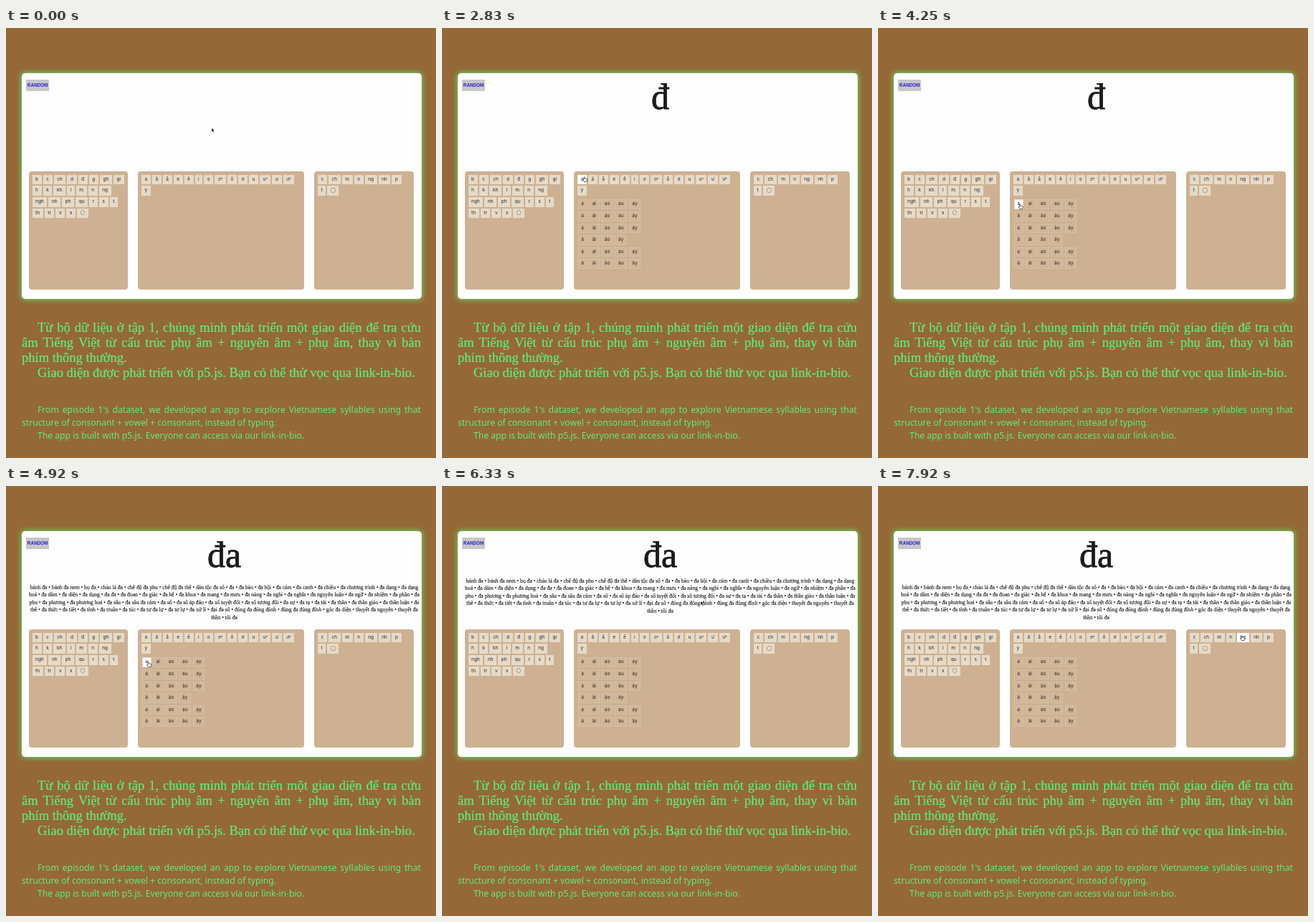
Write an HTML page that moves like this. It is 600 by 600 pixels and loops after 8000 ms.

```html
<!DOCTYPE html>
<html lang="vi">
<head>
<meta charset="utf-8">
<title>Syllable explorer</title>
<style>
html, body { margin: 0; width: 100%; height: 100%; overflow: hidden; }
body { position: relative; background: #956837; }
body > *, .row { position: absolute; white-space: nowrap; }
#app { left: 22px; top: 63px; width: 557.5px; height: 314.5px; border-radius: 5px;
  background: #fdfdfe; box-shadow: 0 0 7px 1px #62d868; }
#random { left: 28px; top: 72px; width: 32px; height: 16px; background: #c8c7c8;
  color: #2a20d2; font: bold 6.3px/15.5px "Liberation Sans", Arial, sans-serif; text-align: center; }
#word, #list { left: 4.5px; width: 600px; text-align: center; color: #1b1a1c;
  font: 50px/50px "Liberation Serif", "Times New Roman", serif; -webkit-text-stroke: .016em; }
#word { top: 70.6px; }
#list { top: 136.8px; font-size: 7.6px; line-height: 10.5px; white-space: pre; }
.box { top: 200px; height: 164.5px; border-radius: 4px; background: #cdb192; }
.row { display: flex; gap: 2px; }
.key { box-sizing: border-box; height: 13.5px; padding: 0 4.6px; background: #e6dac8;
  color: #2b2622; font: 6.5px/13px Inter, "Noto Sans", sans-serif; }
.sub { gap: 2.6px; }
.sub .key { background: #d1b698; box-shadow: inset 0 0 0 .6px #dcc8ae; }
.row .key.on { background: #fff; }
.ring { display: inline-block; box-sizing: border-box; width: 6.6px; height: 6.6px;
  border: .7px dotted #6d655c; border-radius: 50%; vertical-align: -1.2px; }
.text { left: 22px; width: 557px; color: #60ec7f; }
.text div { text-align-last: justify; }
.text .in { padding-left: 22px; }
.text .end { text-align-last: left; }
#vi { top: 408px; font: 18.5px/21px "Liberation Serif", "Times New Roman", serif;
  -webkit-text-stroke: .012em; }
#en { top: 523.5px; font: 12.15px/18px "Noto Sans", "Open Sans", sans-serif; }
#cursor { left: 0; top: 0; width: 12px; height: 12px; overflow: visible; }
</style>
</head>
<body>
<div id="app"></div>
<div id="random">RANDOM</div>
<div id="word"></div>
<div id="list">bánh đa • bánh đa nem • bọ đa • cháo lá đa • chế độ đa phu • chế độ đa thê • dân tộc đa số • đa • đa bào • đa bội • đa cảm • đa canh • đa chiều • đa chương trình • đa dạng • đa dạng
hoá • đa dâm • đa diện • đa dụng • đa đa • đa đoan • đa giác • đa hệ • đa khoa • đa mang • đa mưu • đa năng • đa nghi • đa nghĩa • đa nguyên luận • đa ngữ • đa nhiệm • đa phần • đa
phu • đa phương • đa phương hoá • đa sầu • đa sầu đa cảm • đa số • đa số áp đảo • đa số tuyệt đối • đa số tương đối • đa sự • đa tạ • đa tài • đa thần • đa thần giáo • đa thần luận • đa
thê • đa thức • đa tiết • đa tình • đa truân • đa túc • đa tư đa lự • đa tư lự • đa xử lí • đại đa số • đỏng đa đỏng đảnh • đủng đa đủng đỉnh • góc đa diện • thuyết đa nguyên • thuyết đa
thần • tối đa</div>
<div class="text" id="vi">
  <div class="in">Từ bộ dữ liệu ở tập 1, chúng mình phát triển một giao diện để tra cứu</div>
  <div>âm Tiếng Việt từ cấu trúc phụ âm + nguyên âm + phụ âm, thay vì bàn</div>
  <div class="end">phím thông thường.</div>
  <div class="in end">Giao diện được phát triển với p5.js. Bạn có thể thử vọc qua link-in-bio.</div>
</div>
<div class="text" id="en">
  <div class="in">From episode 1's dataset, we developed an app to explore Vietnamese syllables using that</div>
  <div class="end">structure of consonant + vowel + consonant, instead of typing.</div>
  <div class="in end">The app is built with p5.js. Everyone can access via our link-in-bio.</div>
</div>
<svg id="cursor">
  <path id="arrow" d="M0 0V5.6L1.3 4.5L2.2 6.6L3.2 6.2L2.3 4.1H4Z" fill="#111" stroke="#fff" stroke-width=".4"/>
  <path id="hand" d="M-.6 0Q0-.7.6 0V2L3.6 2.6Q4.4 2.9 4.2 4L3.5 6.6H0L-2 3.9Q-1.8 3-.6 3.8Z"
    fill="#fff" stroke="#222" stroke-width=".7"/>
</svg>
<script>
const $ = id => document.getElementById(id);
const LOOP = 8000, PICK_CONSONANT = 1250, PICK_VOWEL = 2600, PICK_SYLLABLE = 4580;

function add(parent, cls, style) {
  const el = document.createElement('div');
  el.className = cls;
  Object.assign(el.style, style);
  return parent.appendChild(el);
}

function addRows(x, y, pitch, cls, rows) {
  rows.forEach((row, i) => {
    const line = add(document.body, 'row ' + cls, { left: x + 'px', top: y + i * pitch + 'px' });
    for (const label of row.split(' ')) {
      const key = add(line, 'key');
      if (label === '◌') add(key, 'ring');
      else key.textContent = label;
    }
  });
}

for (const [x, w] of [[31.5, 138.5], [184, 232.3], [430, 139]])
  add(document.body, 'box', { left: x + 'px', width: w + 'px' });
addRows(36.5, 204.8, 15.6, '', ['b c ch d đ g gh gi', 'h k kh l m n ng', 'ngh nh ph qu r s t', 'th tr v x ◌']);
addRows(189, 204.8, 15.6, '', ['a ă â e ê i o oᵊ ô ơ u uᵊ ư ưᵊ', 'y']);
addRows(435, 204.8, 15.6, '', ['c ch m n ng nh p', 't ◌']);
addRows(189.7, 239.4, 16.6, 'sub', ['a ai ao au ay', 'á ái áo áu áy', 'ả ải ảo ảu ảy',
  'ã ãi ão ãy', 'ạ ại ạo ạu ạy', 'à ài ào àu ày']);
document.body.append($('cursor'));

const subRows = [...document.querySelectorAll('.sub')];
const keys = [...document.querySelectorAll('.key')].map(el => (
  { el, box: el.getBoundingClientRect(), sub: el.parentNode.classList.contains('sub') }));

// Stops: time, then values
const cursorStops = [[0, 287, 139.5], [400, 287, 139.5], [1050, 109, 206], [1750, 109, 206],
  [2400, 198.5, 208], [3400, 198.5, 208], [3830, 198, 246], [4900, 198, 246],
  [5500, 361, 160.5], [6950, 361, 160.5], [7550, 507.5, 209], [LOOP, 507.5, 209]];
const scrollStops = [[0, 0], [5900, 0], [6150, -8.7], [6400, -8.7], [6600, 0], [LOOP, 0]];

function valuesAt(stops, t) {
  const i = stops.findIndex(s => s[0] > t);
  const [t0, ...from] = stops[i - 1], [t1, ...to] = stops[i];
  const p = (t - t0) / (t1 - t0), e = p * p * (3 - 2 * p);
  return from.map((v, k) => v + (to[k] - v) * e);
}

function draw(now) {
  const t = now % LOOP, open = t >= PICK_VOWEL;
  const [x, y] = valuesAt(cursorStops, t), [scroll] = valuesAt(scrollStops, t);
  let over = false;
  for (const { el, box, sub } of keys) {
    const hit = (open || !sub) && x >= box.left && x <= box.right && y >= box.top && y <= box.bottom;
    el.classList.toggle('on', hit);
    over ||= hit;
  }
  $('word').textContent = t < PICK_CONSONANT ? '' : t < PICK_SYLLABLE ? 'đ' : 'đa';
  $('list').style.visibility = t < PICK_SYLLABLE ? 'hidden' : 'visible';
  $('list').style.transform = `translateY(${scroll}px)`;
  for (const row of subRows) row.style.visibility = open ? 'visible' : 'hidden';
  $('cursor').style.transform = `translate(${x}px, ${y}px)`;
  $('arrow').style.display = over ? 'none' : '';
  $('hand').style.display = over ? '' : 'none';
}

const start = performance.now();
function tick() {
  draw(performance.now() - start);
  requestAnimationFrame(tick);
}
tick();
</script>
</body>
</html>
```
